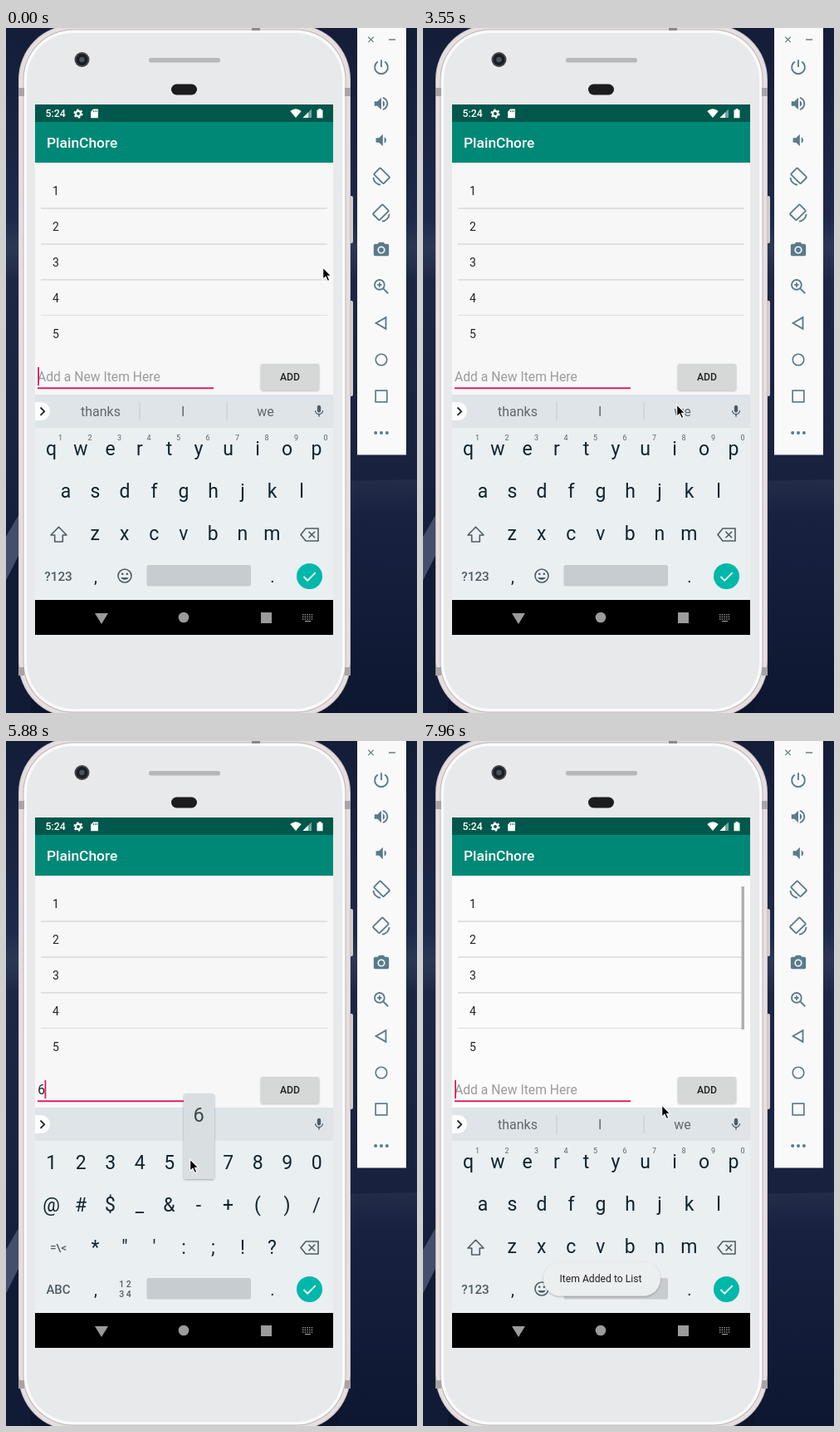
An HTML page for the animation above (8 s loop, 495 by 824 pixels).

```html
<!DOCTYPE html>
<html lang="en">
<head>
<meta charset="utf-8">
<title>To-do list</title>
<style>
html, body { margin: 0; width: 100%; height: 100%; overflow: hidden; background: #16203c; }
svg { display: block; font-family: Roboto, sans-serif; }
</style>
</head>
<body>
<svg id="stage" width="495" height="824" viewBox="0 0 495 824"></svg>
<script>
const LOOP = 8000, START = 731, STEP = 147;

// ---- drawing helpers ----
const rect = (x, y, w, h, fill, more = '') => `<rect x="${x}" y="${y}" width="${w}" height="${h}" fill="${fill}" ${more}/>`;
const disc = (x, y, r, fill, more = '') => `<circle cx="${x}" cy="${y}" r="${r}" fill="${fill}" ${more}/>`;
const shape = (d, fill, more = '') => `<path d="${d}" fill="${fill}" ${more}/>`;
const line = (d, color, width, more = '') => shape(d, 'none', `stroke="${color}" stroke-width="${width}" ${more}`);
const escapeText = s => s.replace(/&/g, '&amp;').replace(/</g, '&lt;');
const text = (s, x, y, size, fill, more = '') =>
  `<text x="${x}" y="${y}" font-size="${size}" fill="${fill}" ${more}>${escapeText(s)}</text>`;
const centered = (s, x, y, size, fill, more = '') => text(s, x, y, size, fill, `text-anchor="middle" ${more}`);
const icon = (x, y, size, body) => `<g transform="translate(${x - size / 2} ${y - size / 2}) scale(${size / 24})">${body}</g>`;
const group = (id, body) => `<g id="${id}">${body}</g>`;
const keyRow = (keys, x, y, size = 23) =>
  [...keys].map((key, i) => centered(key, x + 35.5 * i, y, size, '#10242f')).join('');

const defs = `<defs>
  <linearGradient id="sky" x2="0" y2="1">
    <stop offset="0" stop-color="#141d38"/><stop offset=".28" stop-color="#1d2a4a"/>
    <stop offset=".32" stop-color="#2b3855"/><stop offset=".37" stop-color="#1c2746"/>
    <stop offset=".65" stop-color="#18223f"/><stop offset="1" stop-color="#0d152c"/>
  </linearGradient>
  <linearGradient id="dune" x2="0" y2="1">
    <stop offset="0" stop-color="#232d49"/><stop offset=".15" stop-color="#182140"/><stop offset="1" stop-color="#0e1730"/>
  </linearGradient>
  <filter id="shadow" x="-20%" y="-20%" width="140%" height="150%">
    <feDropShadow dx="0" dy="1" stdDeviation="1" flood-opacity=".3"/>
  </filter>
</defs>`;

function backdrop() {
  return rect(0, 0, 495, 824, 'url(#sky)') +
    shape('M0 612L30 560V605L0 665Z', '#454e6b') +
    shape('M0 665L30 605V824H0Z', '#121b35') +
    shape('M400 545L495 543V824H400Z', 'url(#dune)');
}

function phone() {
  const body = (inset, fill) =>
    rect(15 + inset, -4 + inset, 400 - 2 * inset, 833 - 2 * inset, fill, `rx="${66 - inset}"`);
  const bands = [72, 769].map(y => rect(15, y, 7, 10, '#a9a3a5') + rect(408, y, 7, 10, '#a9a3a5')).join('');
  return rect(412, 202, 6, 57, '#d3cccd', 'rx="2"') + rect(412, 328, 6, 115, '#d3cccd', 'rx="2"') +
    body(0, '#cbc2c4') + body(1, '#e6dfdf') + body(5.5, '#bcb4b6') + body(6.5, '#fafafa') + body(10, '#e8e9eb') + bands +
    rect(296, 0, 10, 3, '#8e888a') +
    disc(91.5, 38, 9, '#45464b') + disc(91.5, 38, 7, '#1c1e24') + disc(91.5, 38, 3.2, '#4b5361') +
    rect(172, 36, 86, 5.5, '#b7b8bb', 'rx="2.5"') +
    rect(199, 67.5, 31, 13, '#1c1c1f', 'rx="6.5"');
}

function toolbar() {
  const c = '#5a7a88', x = 452;
  const stroke = d => line(d, c, 2);
  const rotated = `<g transform="rotate(45 11 11)">${rect(5, 1.5, 12, 18, 'none', `stroke="${c}" stroke-width="2" rx="1.2"`)}</g>` +
    line('M22.5 13A10.5 10.5 0 0 1 13 22.5', c, 2);
  const speaker = 'V4L7 9H3v6h4l5 5V12z';
  const icons = [
    stroke('M12 2.5V12M7.5 5A8.6 8.6 0 1 0 16.5 5'),
    shape('M12 12' + speaker + 'M16.5 12c0-1.77-1.02-3.29-2.5-4.03v8.05c1.48-.73 2.5-2.25 2.5-4.02zM14 3.23v2.06c2.89.86 5 3.54 5 6.71s-2.11 5.85-5 6.71v2.06c4.01-.91 7-4.49 7-8.77s-2.99-7.86-7-8.77z', c),
    shape('M14 12V4L9 9H5v6h4l5 5zM18.5 12c0-1.77-1.02-3.29-2.5-4.03v8.05c1.48-.73 2.5-2.25 2.5-4.02z', c),
    `<g transform="matrix(-1 0 0 1 24 0)">${rotated}</g>`,
    rotated,
    shape('M9 2L7.2 4H4a2 2 0 0 0-2 2v12a2 2 0 0 0 2 2h16a2 2 0 0 0 2-2V6a2 2 0 0 0-2-2h-3.2L15 2z', c) +
      disc(12, 12, 4.1, c, 'stroke="#f9f9f9" stroke-width="1.8"'),
    disc(9.7, 9.7, 6.4, 'none', `stroke="${c}" stroke-width="2"`) + stroke('M14.5 14.5L21 21M6.7 9.7h6M9.7 6.7v6'),
    stroke('M18 4.5V19.5L5 12Z'),
    disc(12, 12, 7.4, 'none', `stroke="${c}" stroke-width="1.8"`),
    rect(4.5, 4.5, 15, 15, 'none', `stroke="${c}" stroke-width="1.8"`),
    [4.5, 12, 19.5].map(dot => disc(dot, 12, 2.2, c)).join('')
  ];
  return rect(423, 0, 59, 513.5, '#f9f9f9') +
    line('M436.3 10.7l6.4 6.4m0-6.4l-6.4 6.4M461 14h8', '#6e7f87', 1.3) +
    icons.map((body, i) => icon(x, 47 + 44 * i, 22, body)).join('');
}

function appBars() {
  return rect(35, 92, 359, 21, '#00574b') + rect(35, 113, 359, 49, '#008876') +
    text('5:24', 47.5, 107, 12.3, '#fff', 'font-weight="500"') +
    disc(87, 103, 3.1, 'none', 'stroke="#fff" stroke-width="2.3"') +
    disc(87, 103, 4.8, 'none', 'stroke="#fff" stroke-width="1.6" stroke-dasharray="2.5 2.53"') +
    shape('M105.2 97.5h5.8v10.8h-8.8v-7.8z', '#fff') + line('M105.5 99v2.2m2-2.2v2.2m2-2.2v2.2', '#00574b', .8) +
    shape('M342.3 100Q349 94.5 355.7 100L349 108Z', '#fff') +
    shape('M368 97.5V108H357.5Z', '#6fa59d') + shape('M364 101.5V108H357.5Z', '#fff') +
    shape('M374.5 98.5h2v-1.5h3v1.5h2v9.8h-7z', '#fff') +
    text('PlainChore', 49, 144, 17.4, '#fff', 'font-weight="500"');
}

function content() {
  const rows = [1, 2, 3, 4, 5].map((n, i) =>
    text(String(n), 56, 201 + 42.9 * i, 14, '#222') +
    (i < 4 ? rect(42, 216.2 + 42.9 * i, 345, i < 3 ? 1.6 : 1, '#dcdcdc') : '')).join('');
  return rect(35, 162, 359, 279, '#f7f7f7', 'id="page"') + rows +
    rect(383.5, 175, 3.5, 172, '#b0b0b0', 'id="scrollbar"') +
    rect(38, 432.3, 212, 1.9, '#d81b60') +
    text('Add a New Item Here', 38, 425, 15.7, '#9b9b9b', 'id="hint"') +
    text('6', 38.3, 425, 15.7, '#222', 'id="entry"') +
    rect(38.2, 408, 1.8, 22, '#d81b60', 'id="caret"') +
    rect(307, 404, 70, 31.5, '#d6d7d7', 'id="button" rx="2" filter="url(#shadow)"') +
    centered('ADD', 342, 424, 12.2, '#222', 'font-weight="500"');
}

function keyboard() {
  const grey = '#4d5c64';
  const mic = 'M12 14c1.66 0 3-1.34 3-3V5c0-1.66-1.34-3-3-3S9 3.34 9 5v6c0 1.66 1.34 3 3 3zm5.3-3c0 3-2.54 5.1-5.3 5.1S6.7 14 6.7 11H5c0 3.41 2.72 6.23 6 6.72V21h2v-3.28c3.28-.48 6-3.3 6-6.72z';
  const words = ['thanks', 'I', 'we'].map((word, i) => centered(word, 114 + 99.3 * i, 467, 16, '#5f686d')).join('') +
    rect(160.5, 450, 1, 22, '#c3c9cd') + rect(265.5, 450, 1, 22, '#c3c9cd');
  const letters = keyRow('qwertyuiop', 54.5, 514) + keyRow('asdfghjkl', 72, 565) + keyRow('zxcvbnm', 107.3, 616) +
    [...'1234567890'].map((n, i) => centered(n, 65.5 + 35.5 * i, 496, 9, '#58666d')).join('') +
    line('M63.5 600.3L73 610H68.3V618H58.7V610H54Z', grey, 1.6, 'stroke-linejoin="round"') +
    centered('?123', 63, 664.5, 15.3, grey, 'font-weight="500"') +
    disc(143, 659, 8, 'none', `stroke="${grey}" stroke-width="1.6"`) +
    disc(140.2, 656.7, 1.3, grey) + disc(145.8, 656.7, 1.3, grey) + shape('M138.3 661h9.4a5 4 0 0 1-9.4 0', grey);
  const symbols = keyRow('1234567890', 54.8, 515) + keyRow('@#$_&-+()/', 54.5, 566) + keyRow('*"\':;!?', 107.5, 617) +
    centered('=\\<', 63, 614, 13.5, grey, 'font-weight="500"') +
    centered('ABC', 63, 664.5, 15, grey, 'font-weight="500"') +
    centered('1 2', 143.5, 657, 10.5, grey, 'font-weight="500"') +
    centered('3 4', 143.5, 669, 10.5, grey, 'font-weight="500"');
  return rect(35, 441, 359, 40, '#dee4e8') + rect(35, 481, 359, 207, '#eaeff2') +
    shape('M35 450H42A11 11 0 0 1 42 472H35Z', '#fbfcfc') + line('M41.5 456.5l4.7 4.7-4.7 4.7', '#222', 1.8) +
    icon(377, 461, 17.5, shape(mic, grey)) +
    group('words', words) + group('letters', letters) + group('symbols', symbols) +
    line('M355 609.5L361 602H376V617H361ZM364.5 605.7l7.6 7.6m0-7.6l-7.6 7.6', grey, 1.6) +
    centered(',', 108, 667, 20, '#10242f') + centered('.', 321, 667, 20, '#10242f') +
    rect(169.5, 646, 125.5, 25.5, '#c7ccd0', 'rx="2.5"') +
    disc(365.5, 659.5, 15.5, '#00b8a9') + line('M358.5 660l4.7 4.7 9.5-9.5', '#fff', 1.8) +
    group('popup', rect(214, 424, 37, 103, '#d9dee1', 'rx="3" filter="url(#shadow)"') + centered('6', 232, 458, 23.5, '#37474f'));
}

function navigation() {
  const grey = '#9b9b9b';
  let dots = '';
  for (let i = 0; i < 15; i++) dots += rect(357 + 2.7 * (i % 5), 705 + 2.7 * Math.floor(i / 5), 1.4, 1.4, grey);
  return rect(35, 688, 359, 42, '#000') + shape('M107 704H123L115 717Z', grey) + disc(214, 709, 6.3, grey) +
    rect(307, 703, 13, 13, grey) + dots + rect(360, 713, 7, 1.2, grey);
}

const toast = group('toast',
  rect(145, 626.5, 141, 41, '#eceff0', 'rx="20.5" filter="url(#shadow)"') +
  centered('Item Added to List', 214, 651, 12.2, '#222'));
const arrow = 'M0 0V15.5L3.6 12.1L6.1 18L8.8 16.9L6.3 11.2H11Z';
const pointer = group('pointer',
  shape(arrow, '#000', 'stroke="#fff" stroke-width="1.2" transform="translate(.7 1) scale(.92)"'));

const stage = document.getElementById('stage');
stage.innerHTML = defs + backdrop() + phone() + toolbar() + appBars() + content() + keyboard() + navigation() + toast + pointer;
const el = id => document.getElementById(id);
const show = (id, on) => el(id).setAttribute('visibility', on ? 'visible' : 'hidden');

// ---- motion: pointer stops as [step, x, y] ----
const path = [
  [-1, 381, 287], [1, 322, 480], [2, 294, 585], [3, 281, 616], [7, 186, 616], [10, 86, 655], [12, 73, 659],
  [13, 73, 659], [16, 290, 470], [17, 307, 450], [19, 305, 452], [22, 122, 580], [23, 72, 688], [25, 74, 663],
  [26, 74, 663], [29, 212, 505], [31, 221, 502], [35, 221, 502], [37, 346, 447], [38, 351, 432],
  [40, 348, 424], [47, 348, 424], [49, 287, 437]
];

function pointerAt(step) {
  const next = path.findIndex(stop => stop[0] >= step);
  if (next <= 0) return path[0].slice(1);
  const [s0, x0, y0] = path[next - 1], [s1, x1, y1] = path[next];
  const p = (step - s0) / (s1 - s0);
  return [x0 + (x1 - x0) * p, y0 + (y1 - y0) * p];
}

// The blink restarts whenever the text changes.
function caretOn(time, step) {
  if (time < START) return time < 300;
  if (step >= 42) return (step - 42) % 6 < 3;
  if (step >= 35) return step < 38;
  return step % 7 < 4;
}

function render(time) {
  const step = Math.max(-1, Math.floor((time - START) / STEP));
  const [x, y] = pointerAt(step);
  const typed = step >= 35 && step < 42, added = step >= 42;
  const symbolsOpen = step >= 27 && !added;

  el('pointer').setAttribute('transform', `translate(${Math.round(x)} ${Math.round(y)})`);
  show('letters', !symbolsOpen);
  show('symbols', symbolsOpen);
  show('popup', step === 34 || step === 35);
  show('words', step < 35 || step >= 43);
  show('hint', !typed);
  show('entry', typed);
  show('caret', caretOn(time, step));
  el('caret').setAttribute('x', typed ? 46.5 : 38.2);
  show('scrollbar', added);
  el('page').setAttribute('fill', added ? '#fbfbfb' : '#f7f7f7');
  el('button').setAttribute('fill', step === 42 ? '#bababa' : '#d6d7d7');
  el('toast').setAttribute('opacity', Math.max(0, Math.min(1, (step - 42) / 3)));
}

const begin = performance.now();
function tick() {
  render((performance.now() - begin) % LOOP);
  requestAnimationFrame(tick);
}
tick();
</script>
</body>
</html>
```
